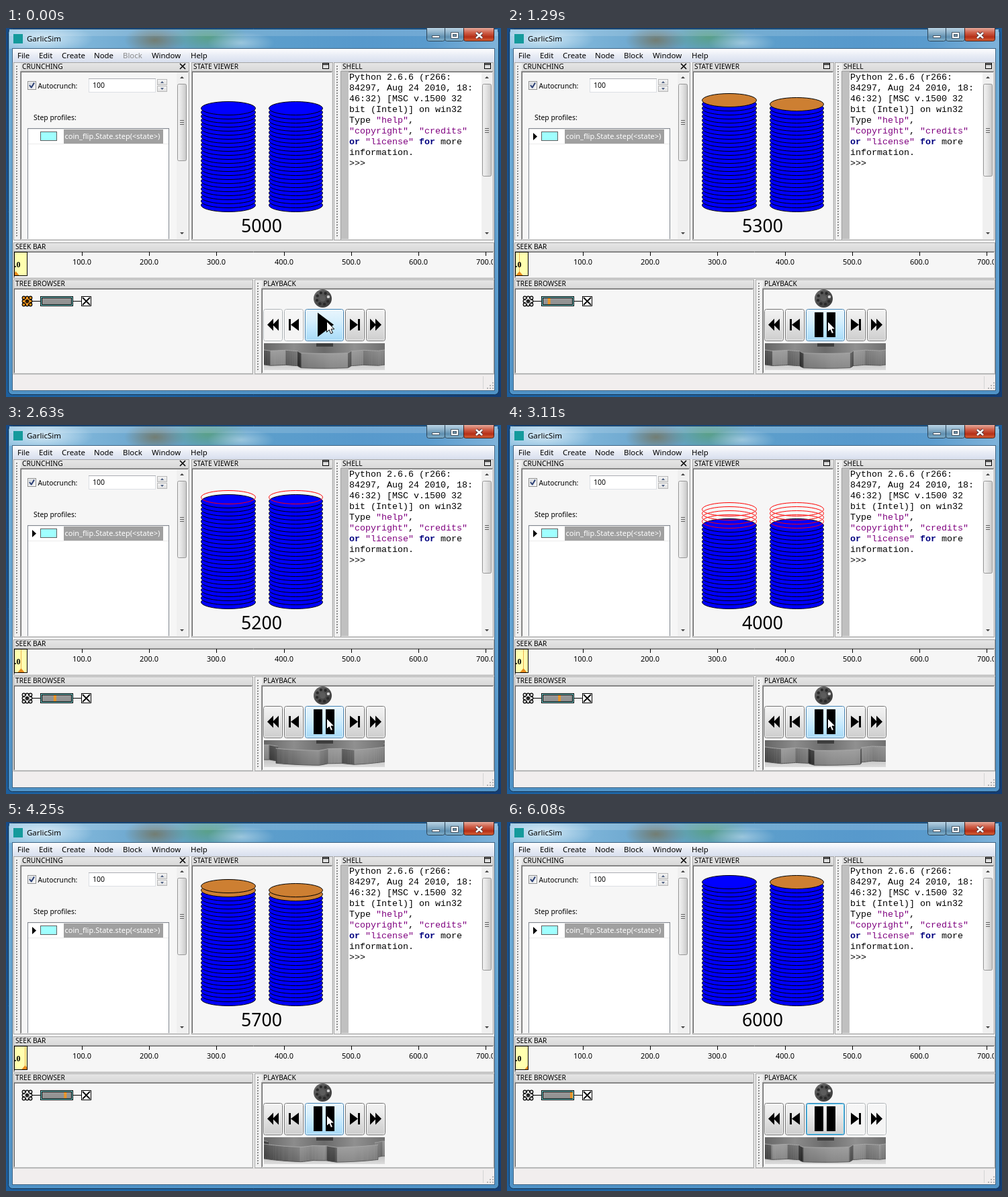
Write an HTML page with a canvas that moves like this. It is 737 px wide and 549 px high and loops after 6650 ms.

```html
<!DOCTYPE html>
<html lang="en">
<head>
<meta charset="utf-8">
<title>GarlicSim</title>
<style>
html, body { margin: 0; width: 100%; height: 100%; overflow: hidden; background: #1d5688; }
canvas { display: block; }
</style>
</head>
<body>
<canvas id="stage" width="737" height="549"></canvas>
<script>
const c = document.getElementById('stage').getContext('2d');
const LOOP = 6650;
const UI = '"Noto Sans", "Open Sans", sans-serif';
const MONO = '"Liberation Mono", monospace';

// Doubling bets: every win returns to a stake of 100.
const flips = 'WWLWWWLLLLWLLWWWW';
const flipTimes = [476, 740, 1005, 1290, 1600, 1950, 2200, 2460, 2710, 2960,
  3185, 3440, 3715, 4160, 4440, 4640, 4960];
const funds = [5000];
let stake = 100;
for (const f of flips) {
  const last = funds[funds.length - 1];
  funds.push(f === 'W' ? last + stake : last - stake);
  stake = f === 'W' ? 100 : stake * 2;
}
const LAST = flips.length;

// Screen refreshes: first, last, count.
const bursts = [[300, 740, 6], [910, 1480, 7], [1600, 1770, 3], [1950, 2040, 2],
  [2200, 2280, 2], [2460, 2710, 4], [2870, 2960, 2], [3110, 3260, 3],
  [3440, 3990, 7], [4160, 4250, 2], [4440, 4440, 1], [4640, 4640, 1], [4800, 4800, 1]];
const ticks = [0];
for (const [a, b, n] of bursts)
  for (let i = 0; i < n; i++) ticks.push(n > 1 ? a + (b - a) * i / (n - 1) : a);
const turns = [[300, 0], [1290, 61], [2040, 123], [3110, 189], [3810, 238], [4800, 300.5]];

function gearAngle(t) {
  let q = 0;
  for (const s of ticks) if (s <= t) q = s;
  if (q <= 300) return 0;
  for (let i = 1; i < turns.length; i++) {
    const [t0, a0] = turns[i - 1], [t1, a1] = turns[i];
    if (q <= t1) return a0 + (a1 - a0) * (q - t0) / (t1 - t0);
  }
  return 300.5;
}

function grad(x0, y0, x1, y1, ...cols) {
  const g = c.createLinearGradient(x0, y0, x1, y1);
  cols.forEach((col, i) => g.addColorStop(i / (cols.length - 1), col));
  return g;
}
const down = (y, h, ...cols) => grad(0, y, 0, y + h, ...cols);

function box(x, y, w, h, fill, line) {
  if (fill) { c.fillStyle = fill; c.fillRect(x, y, w, h); }
  if (line) { c.strokeStyle = line; c.lineWidth = 1; c.strokeRect(x + .5, y + .5, w - 1, h - 1); }
}
function round(x, y, w, h, r, fill, line) {
  c.beginPath();
  c.roundRect(x + .5, y + .5, w - 1, h - 1, r);
  if (fill) { c.fillStyle = fill; c.fill(); }
  if (line) { c.strokeStyle = line; c.lineWidth = 1; c.stroke(); }
}
function disc(x, y, r, fill) {
  c.beginPath();
  c.arc(x, y, r, 0, 7);
  c.fillStyle = fill;
  c.fill();
}
function poly(pts, fill) {
  c.beginPath();
  for (let i = 0; i < pts.length; i += 2) c.lineTo(pts[i], pts[i + 1]);
  c.closePath();
  c.fillStyle = fill;
  c.fill();
}
function lines(pts, color, width = 1) {
  c.beginPath();
  for (let i = 0; i < pts.length; i += 4) {
    c.moveTo(pts[i], pts[i + 1]);
    c.lineTo(pts[i + 2], pts[i + 3]);
  }
  c.strokeStyle = color;
  c.lineWidth = width;
  c.stroke();
}
function text(s, x, y, size, color = '#000', font = UI, align = 'left', weight = '') {
  c.font = `${weight} ${size}px ${font}`;
  c.textAlign = align;
  c.fillStyle = color;
  c.fillText(s, x, y);
}
function clipped(x, y, w, h, draw) {
  c.save();
  c.beginPath();
  c.rect(x, y, w, h);
  c.clip();
  draw();
  c.restore();
}
function blur(x, y, rx, ry, rgb, alpha) {
  c.save();
  c.translate(x, y);
  c.scale(1, ry / rx);
  const g = c.createRadialGradient(0, 0, 0, 0, 0, rx);
  g.addColorStop(0, `rgba(${rgb},${alpha})`);
  g.addColorStop(1, `rgba(${rgb},0)`);
  disc(0, 0, rx, g);
  c.restore();
}

function frame() {
  box(0, 0, 737, 549, grad(0, 0, 737, 549, '#164a86', '#1f68a8', '#123c74'));
  round(3, 1, 731, 545, 6, down(0, 546, '#74b0d8', '#6aaad6', '#5f9fd0', '#4f92c6'), '#12304e');
  box(5, 2, 727, 29, grad(5, 0, 732, 0, '#8dc0e0', '#7fb6da', '#6aa5cd', '#5e9fc9',
    '#5b9dcc', '#5799cc', '#5a9bcd', '#7fb3da'));
  clipped(5, 2, 727, 29, () => {
    blur(222, 18, 46, 22, '118,112,84', .75);
    blur(300, 14, 60, 26, '88,160,112', .7);
    blur(350, 22, 50, 16, '196,224,236', .6);
    blur(55, 16, 75, 22, '235,246,252', .75);
  });
  box(5, 2, 727, 10, 'rgba(255,255,255,.14)');
  box(11, 9, 14, 14, '#149a9c');
  text('GarlicSim', 31, 20, 11.5);

  const glass = down(0, 20, '#b9d3e4', '#8fb3cb', '#5f8fb0', '#86b5cf');
  round(626, -3, 28, 23, 3, glass, '#2c4558');
  round(653, -3, 29, 23, 3, glass, '#2c4558');
  round(681, -3, 46, 23, 3, down(0, 20, '#e5a99b', '#d0614b', '#b52f17', '#d9693c'), '#42201c');
  box(634, 11, 12, 4, '#fff', '#4b5a68');
  box(662, 6, 12, 10, '#fff', '#4b5a68');
  box(665, 9, 6, 4, '#6f95ae', '#4b5a68');
  lines([700, 7, 709, 15, 709, 7, 700, 15], '#53343a', 4.4);
  lines([700, 7, 709, 15, 709, 7, 700, 15], '#fff', 2.6);

  box(9, 30, 719, 510, '#f0f0f0', '#3f6484');
  box(10, 31, 717, 20, down(31, 20, '#fdfdfe', '#e8ecf5', '#d8dfee'));
  box(10, 515, 717, 24, '#f1eeee');
  lines([10, 515.5, 727, 515.5], '#d6d6d6');
  lines([710.5, 518, 710.5, 537], '#d4d4d4');
  for (let i = 0; i < 3; i++)
    for (let j = 0; j <= i; j++) box(724 - j * 4, 527 + i * 4, 2, 2, '#b5b5b5');
}

function pane(x, y, w, h, title, grip) {
  const g = grip ? 10 : 0;
  const left = x + g, right = x + w, bottom = y + h;
  box(x, y, w, h, '#f0f0f0', '#a5a5a5');
  box(left + 1, y + 1, w - 2 - g, 12, down(y, 13, '#e6e6e6', '#d9d9d9'));
  box(left + 1, y + 13, w - 2 - g, h - 14, '#f6f6f6');
  lines([left + .5, bottom - 1, left + .5, y + 13.5, left, y + 13.5, right - 1, y + 13.5], '#a0a0a0');
  lines([left + 1.5, bottom - 2, left + 1.5, y + 14, left + 1, y + 14.5, right - 2, y + 14.5], '#696969');
  lines([right - 1.5, y + 14, right - 1.5, bottom - 1, left + 1, bottom - 1.5, right - 1, bottom - 1.5], '#e3e3e3');
  if (grip) for (let d = y + 5; d < bottom - 4; d += 4) {
    box(x + 4, d, 2, 2, '#8a8a8a');
    box(x + 6, d + 1, 1, 2, '#fff');
  }
  text(title, left + 3, y + 10, 10.2);
}
function winIcon(x) {
  box(x, 52, 10, 9, null, '#000');
  box(x, 52, 10, 3, '#000');
  box(x + 1, 53, 8, 1, '#aaa');
}
function scrollbar(x, thumbH) {
  box(x, 66, 16, 248, '#f0f0f0');
  poly([x + 5, 75, x + 8, 72, x + 11, 75], '#404040');
  poly([x + 5, 304, x + 8, 307, x + 11, 304], '#404040');
  round(x + 1, 83, 14, thumbH, 2, grad(x, 0, x + 15, 0, '#f8f8f8', '#e3e3e3', '#c6c6c6'), '#979797');
  const m = 83 + thumbH / 2 | 0;
  for (let i = -3; i <= 3; i += 3) box(x + 5, m + i, 6, 1, '#606060');
}

function crunching(started) {
  pane(11, 51, 262, 265, 'CRUNCHING', true);
  lines([259, 53, 267, 61, 267, 53, 259, 61], '#000', 1.6);
  box(32, 79, 13, 13, '#f4f4f4', '#8e8f8f');
  box(34, 81, 9, 9, grad(34, 81, 43, 90, '#cfd4d9', '#f6f6f6'));
  lines([35, 85, 38, 89, 37.5, 89, 42, 81.5], '#2b3f73', 2);
  text('Autocrunch:', 47.5, 90, 10.3);
  box(123, 75, 100, 21, '#fff', '#dcdfe4');
  lines([123, 75.5, 223, 75.5], '#abadb3');
  text('100', 129, 89, 10.5);
  for (const y of [76, 86]) box(225, y, 15, 9, down(y, 9, '#f6f6f6', '#dedede'), '#b8b8b8');
  poly([230, 82, 232.5, 79, 235, 82], '#4a5d80');
  poly([230, 89, 232.5, 92, 235, 89], '#4a5d80');
  text('Step profiles:', 41, 137, 10.4);
  box(32, 149, 211, 165, '#fff', '#828790');
  box(33, 313, 209, 1, '#fff');
  lines([33, 150.5, 242, 150.5, 33, 172.5, 242, 172.5], '#ececec');
  box(86, 151, 148, 21, '#a0a0a0');
  text('coin_flip.State.step(<state>)', 87.5, 165, 11, '#fff');
  box(51, 154, 25, 14, '#a0ffff', '#606060');
  if (started) poly([39, 156, 45, 161.5, 39, 167], '#000');
  scrollbar(254, 115);
}

function stack(x, rx, now, before) {
  const coin = (i, fill, line) => {
    c.beginPath();
    c.ellipse(x, 263.5 - i * 6, rx, 10, 0, 0, 7);
    if (fill) { c.fillStyle = fill; c.fill(); }
    c.strokeStyle = line;
    c.lineWidth = 1;
    c.stroke();
  };
  for (let i = 0; i < now; i++) coin(i, i < before ? '#00f' : '#cd7f32', '#000');
  for (let i = now; i < before; i++) coin(i, null, '#f00');
}
function viewer(k) {
  pane(276, 51, 211, 265, 'STATE VIEWER', false);
  winIcon(471);
  const now = funds[k] / 100, before = funds[Math.max(0, k - 1)] / 100;
  stack(331, 40.5, Math.ceil(now / 2), Math.ceil(before / 2));
  stack(431.5, 40, Math.floor(now / 2), Math.floor(before / 2));
  text(funds[k], 380.5, 304, 26.7, '#000', UI, 'center');
}

const shellText = ['Python 2.6.6 (r266:', '84297, Aug 24 2010, 18:', '46:32) [MSC v.1500 32',
  'bit (Intel)] on win32', 'Type "help",', '"copyright", "credits"',
  'or "license" for more', 'information.', '>>>'];
function shell() {
  pane(488, 51, 238, 265, 'SHELL', true);
  winIcon(712);
  box(510, 66, 214, 248, '#fff');
  box(499, 65, 11, 249, '#c0c0c0');
  shellText.forEach((row, i) => {
    let x = 511;
    for (const part of row.split(/("[^"]*"|\bor\b|\bfor\b)/)) {
      const word = part === 'or' || part === 'for';
      const color = part[0] === '"' ? '#7f007f' : word ? '#00007f' : '#000';
      text(part, x, 77 + i * 16, 13.333, color, MONO, 'left', word ? 'bold' : '');
      x += part.length * 8;
    }
  });
  scrollbar(708, 138);
}

function seekBar(k) {
  pane(11, 319, 716, 54, 'SEEK BAR', false);
  clipped(13, 333, 712, 38, () => {
    for (let i = 1; i <= 7; i++) {
      const x = Math.round(12.9 + i * 100.15);
      box(x, 333, 1, 6, '#000');
      text(i * 100 + '.0', x, 352, 11, '#000', UI, 'center');
    }
  });
  box(12, 333, 20, 36, '#ffffb0', '#000');
  clipped(13, 334, 18, 34, () => {
    const x = 14 + k;
    if (k > 0 && k < LAST) box(x, 334, 1, 34, '#f0b050');
    poly([x - 5.5, 369, x + .5, 362, x + 6.5, 369], '#e88a1c');
    text('.0', 12.5, 356, 12, '#000', '"Liberation Serif", serif', 'left', 'bold');
  });
}

function treeBrowser(k) {
  pane(11, 374, 357, 141, 'TREE BROWSER', false);
  lines([38, 406.5, 51, 406.5, 100, 406.5, 113, 406.5], '#000');
  const lobes = (r, color) => {
    for (let i = 0; i < 9; i++)
      disc(31.5 + 5 * (i % 3 - 1), 406.5 + 5 * ((i / 3 | 0) - 1), r, color);
  };
  lobes(2.9, '#000');
  lobes(1.7, k ? '#e6e6e6' : '#ff9a1f');
  c.beginPath();
  c.arc(31.5, 406.5, 3.6, 0, 7);
  c.strokeStyle = k ? '#e6e6e6' : '#ff9a1f';
  c.lineWidth = 1.5;
  c.stroke();
  disc(31.5, 406.5, 1.4, '#000');
  box(51, 399, 49, 15, '#7fdcdc', '#000');
  box(53, 401, 45, 11, '#949494', '#000');
  if (k) box(53 + (k - 1) * 2.56, 402, 4, 9, '#e8962c');
  box(112, 399, 15, 15, '#fff', '#000');
  lines([114, 401, 125, 412, 125, 401, 114, 412], '#000', 1.8);
}

function knob() {
  disc(471.5, 402.5, 13.5, grad(460, 390, 483, 416, '#6c6c6c', '#4c4c4c', '#3a3a3a'));
  for (let i = 0; i < 8; i++) {
    const a = i * Math.PI / 4 - .3;
    disc(471.5 + 8.8 * Math.cos(a), 402.5 + 8.8 * Math.sin(a), 2.2, i ? '#2a2a2a' : '#d0d0d0');
  }
  disc(471.5, 402.5, 4.5, '#5c5c5c');
}

function gear(turn) {
  const rad = Math.PI / 180;
  const point = a => {
    const d = Math.abs((((a - turn + 30) % 60) + 60) % 60 - 30);
    const r = d < 17 ? 118 : d > 24 ? 98 : 118 - 20 * (d - 17) / 7;
    return [474 + r * Math.sin(a * rad), 469 + r * Math.cos(a * rad) * .13];
  };
  clipped(384, 469, 180, 40, () => {
    box(384, 469, 180, 40, down(469, 40, '#8a8a8a', '#b0b0b0', '#dcdcdc'));
    const top = [];
    for (let a = -180; a < 180; a++) top.push(...point(a));
    poly(top, grad(384, 0, 564, 0, '#666', '#8c8c8c', '#6a6a6a', '#909090', '#707070'));
    box(462, 469, 25, 5, '#3e3e3e');
    for (let i = 99; i >= 0; i--) for (const a of [-i - 1, i]) {
      const [x0, y0] = point(a), [x1, y1] = point(a + 1);
      if (x1 <= x0) continue;
      const n = Math.atan2((y0 - y1) / .13, x1 - x0);
      const v = Math.round(106 + 52 * Math.cos(n * 1.7 - .5));
      const dark = v - 22;
      poly([x0, y0, x1 + .4, y1, x1 + .4, y1 + 22, x0, y0 + 22],
        down(y0, 22, `rgb(${v},${v},${v})`, `rgb(${dark},${dark},${dark})`));
      lines([x0, y0, x1, y1], '#aaa');
      lines([x0, y0 + 22, x1, y1 + 22], '#555');
    }
  });
}

function button(x, w, look, alpha = 1) {
  const looks = {
    normal: ['#f4f4f4', '#e9e9e9', '#dadada', '#cdcdcd', '#707070'],
    flat: ['#f7f7f7', '#f5f5f5', '#f4f4f4', '#f4f4f4', '#adb2b5'],
    hover: ['#eaf6fd', '#d9f0fc', '#bee6fd', '#a7d9f5', '#3c7fb1'],
    down: ['#d3ecf8', '#b6dff3', '#8fcaea', '#75b8dd', '#2c628b'],
    focus: ['#f2f2f2', '#ebebeb', '#dddddd', '#cfcfcf', '#3c7fb1']
  };
  const [a, b, d, e, line] = looks[look];
  c.globalAlpha = alpha;
  round(x, 418, w, 48, 3, down(418, 48, a, b, d, e), line);
  round(x + 1, 419, w - 2, 46, 2, null, look === 'focus' ? '#48c8f0' : 'rgba(255,255,255,.75)');
  c.globalAlpha = 1;
}
function arrow(x, dir, w = 9, h = 9) {
  poly([x, 441.5, x + dir * w, 441.5 - h, x + dir * w, 441.5 + h], '#000');
}

function playback(t, k) {
  pane(370, 374, 357, 141, 'PLAYBACK', true);
  knob();
  const back = k ? 'normal' : 'flat', ahead = k < LAST ? 'normal' : 'flat';
  button(383, 29, back);
  button(414, 29, back);
  button(505, 29, ahead);
  button(536, 29, ahead);
  button(445, 58, t >= 120 && t < 300 ? 'down' : 'hover');
  if (t >= 5900) button(445, 58, 'focus', t < 5990 ? .35 : t < 6080 ? .7 : 1);
  arrow(389, 1); arrow(397, 1);
  box(421, 433, 3, 17, '#000'); arrow(424, 1, 12);
  arrow(524, -1, 12); box(524, 433, 3, 17, '#000');
  arrow(551, -1); arrow(559, -1);
  if (t < 300) arrow(488, -1, 24, 18);
  else {
    box(458, 423, 13, 37, '#000');
    box(476, 423, 13, 37, '#000');
  }
  gear(gearAngle(t));
}

function cursor(x, y) {
  c.save();
  c.translate(x + .5, y + .5);
  poly([0, 0, 0, 16, 3.7, 12.5, 6.2, 18.2, 9, 17, 6.5, 11.5, 11.3, 11.5], '#fff');
  c.strokeStyle = '#000';
  c.lineWidth = 1;
  c.stroke();
  c.restore();
}

function draw(t) {
  const started = t >= 300;
  const k = flipTimes.filter(s => s <= t).length;
  c.clearRect(0, 0, 737, 549);
  frame();
  const menu = { File: 17, Edit: 49, Create: 83, Node: 131, Block: 174, Window: 217, Help: 275 };
  for (const name in menu)
    text(name, menu[name], 45, 11.4, name === 'Block' && !started ? '#8a8a8a' : '#000');
  crunching(started);
  viewer(k);
  shell();
  seekBar(k);
  treeBrowser(k);
  playback(t, k);
  if (t < 5900) cursor(477, 436);
  else if (t < 5990) cursor(300, 270);
  else if (t < 6080) cursor(84, 66);
}

const begin = performance.now();
function tick() {
  draw((performance.now() - begin) % LOOP);
  requestAnimationFrame(tick);
}
tick();
</script>
</body>
</html>
```
